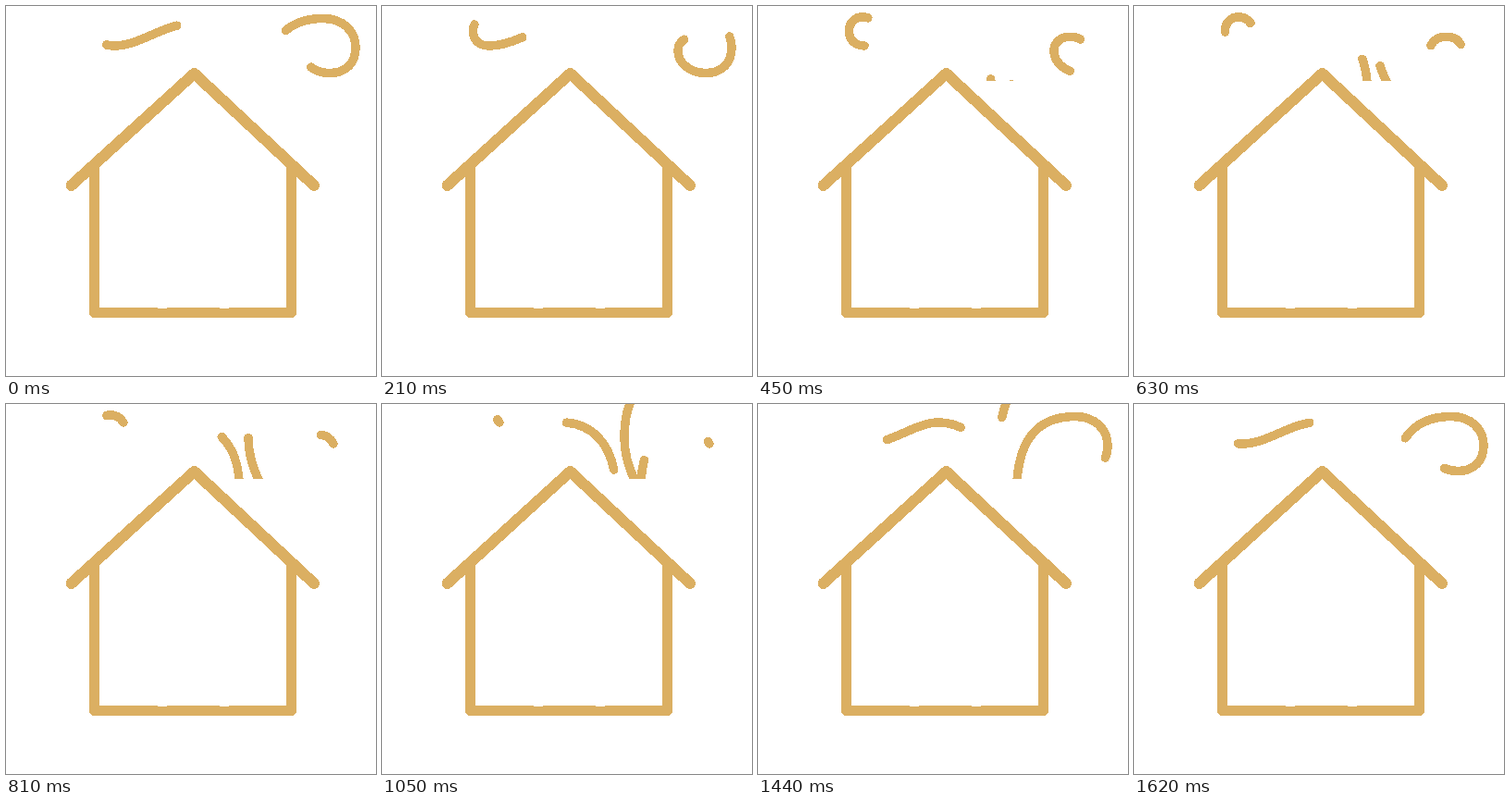
These frames come from a looping animation (400x400 px, 2.15 s). An HTML page:

```html
<!DOCTYPE html>
<html lang="en">
<head>
<meta charset="utf-8">
<title>House with smoke</title>
<style>
  html, body { margin: 0; width: 100%; height: 100%; overflow: hidden; background: #fff; }
  svg { display: block; width: 400px; height: 400px; shape-rendering: crispEdges; }
  path { fill: none; stroke: #dbaf62; stroke-linecap: round; stroke-linejoin: round; }
  .walls { stroke-width: 11; }
  .roof { stroke-width: 12; }
  .notches { stroke: #fff; stroke-width: 1; stroke-linecap: butt; }
  #smoke { stroke-width: 9.5; }
</style>
</head>
<body>
<svg viewBox="0 0 400 400">
  <clipPath id="aboveRoof"><rect width="400" height="81"/></clipPath>
  <path class="walls" d="M95.5 173V331.5H308.5V173"/>
  <path class="roof" d="M70.5 194L203.5 73L333 194"/>
  <path class="notches" d="M164 326.5h10M231 326.5h10"/>
  <g id="smoke" clip-path="url(#aboveRoof)"></g>
</svg>
<script>
const LOOP = 2150, STEP = 30, STEPS = 55, CYCLE = STEP * STEPS;

const easeInOut = p => p * p * (3 - 2 * p);
const easeIn = p => p ** 1.5;
const easeOut = p => 1 - (1 - p) ** 2.5;

// head and tail: when each end of the stroke leaves and arrives, in ms
const trails = [
  {
    d: `M252 111V90C253 52 232 20 195 20C170 20 144 43.5 116 43C104 43 98.5 36 98.5 27
        C98.5 18 105 11.8 113 11.8C119 11.8 124 15 127 20`,
    ease: easeInOut, head: [-80, 2400], tail: [470, 2870]
  },
  {
    d: `M279.5 95C280 44 298 13.5 343 13.5C364 13.5 378 27 378 45C378 62 367 72.5 350 72.5
        C333 72.5 319.5 61 320 48C320 39 328 33.3 337 33.3C346 33.3 350 35.5 354 43`,
    ease: easeOut, head: [980, 2460], tail: [1500, 2910]
  },
  {
    d: "M280 95C268 75 262 57 262 36C262 20 265 6 269 -3L276 -20",
    ease: easeIn, head: [275, 1110], tail: [945, 1575]
  }
];

const progress = (t, [from, to]) => Math.min(Math.max((t - from) / (to - from), 0), 1);

// Each trail outlives one cycle, so it is drawn twice: the new puff and the fading one
const strokes = trails.flatMap(trail => [0, CYCLE].map(shift => {
  const el = document.createElementNS("http://www.w3.org/2000/svg", "path");
  el.setAttribute("d", trail.d);
  el.setAttribute("pathLength", 1);
  document.getElementById("smoke").append(el);
  return { ...trail, el, shift };
}));

function draw(now) {
  const t = Math.min(Math.floor(now % LOOP / STEP), STEPS - 1) * STEP;
  for (const { el, shift, ease, head, tail } of strokes) {
    const from = ease(progress(t + shift, tail));
    const size = ease(progress(t + shift, head)) - from;
    el.style.display = size > 0.001 ? "" : "none";
    el.style.strokeDasharray = `${Math.max(size, 0)} 2`;
    el.style.strokeDashoffset = -from;
  }
}

const start = performance.now();
function tick() {
  draw(performance.now() - start);
  requestAnimationFrame(tick);
}
tick();
</script>
</body>
</html>
```
